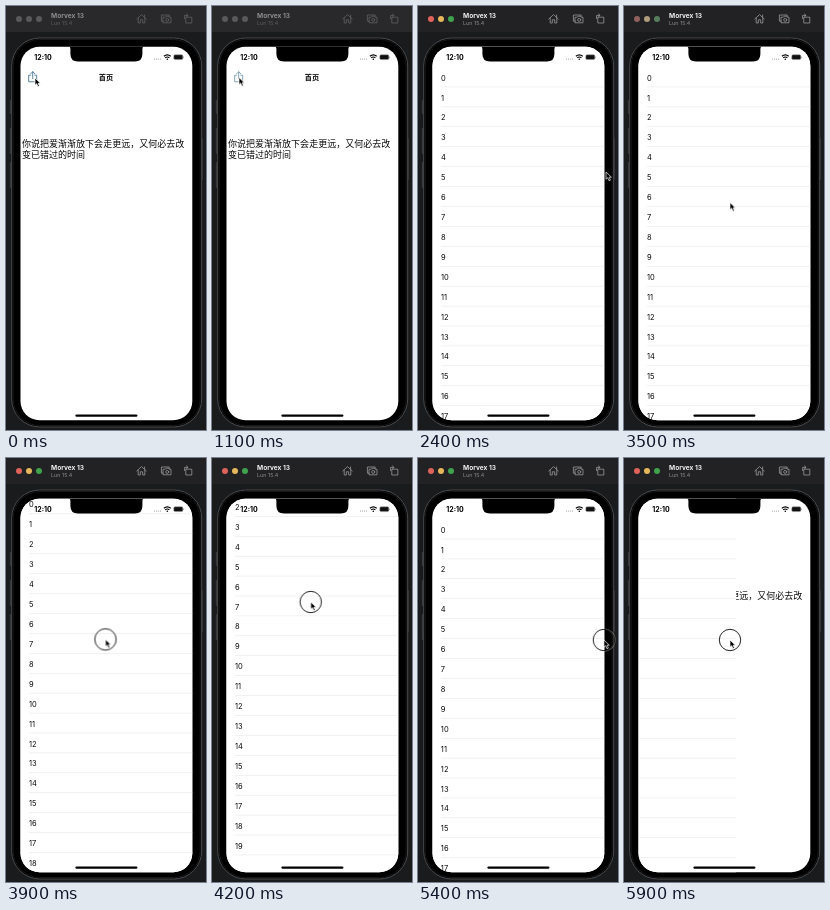
Write an HTML page that moves like this. It is 200 px wide and 424 px high and loops after 6000 ms.

```html
<!DOCTYPE html>
<html lang="zh">
<head>
<meta charset="utf-8">
<title>Drawer demo</title>
<style>
html, body { margin: 0; width: 100%; height: 100%; overflow: hidden; background: #1b1c1e; }
svg { display: block; width: 100%; height: 100%; }
text { font-family: Inter, "Noto Sans CJK SC", "Noto Sans CJK", sans-serif; }
.cjk { font-family: "Noto Sans CJK SC", "Noto Sans CJK", sans-serif; }
.line { fill: none; stroke-linejoin: round; stroke-linecap: round; }

.bar, .title, .lights, .lights circle, .share, .drawer, .rows, .pointer, .touch {
  animation: 6s linear infinite;
}
.bar { animation-name: bar; }
.title { animation-name: focus; }
.lights { animation-name: mute; }
.lights circle { animation-name: unlit; }
.share { animation-name: press; }
.drawer { animation-name: drawer; }
.rows { animation-name: scroll; }
.pointer { animation-name: pointer; }
.touch { animation-name: touch; }

@keyframes bar {
  0%, 21.66% { fill: #29292b; }
  21.67%, 100% { fill: #222224; }
}
@keyframes focus {
  0%, 21.66% { opacity: .5; }
  21.67%, 100% { opacity: 1; }
}
@keyframes unlit {
  0%, 21.66% { fill: #59595b; }
  21.67%, 100% { fill: var(--lit); }
}
@keyframes mute {
  0%, 56.66% { filter: none; }
  56.67%, 61.66% { filter: saturate(.45) brightness(.85); }
  61.67%, 100% { filter: none; }
}
@keyframes press {
  0%, 18.33% { opacity: 1; }
  18.334%, 21.66% { opacity: .75; }
  21.67%, 100% { opacity: 1; }
}
@keyframes drawer {
  0% { transform: translateX(-174px); }
  21.667% { transform: translateX(-174px); animation-timing-function: ease-in-out; }
  28.333%, 90% { transform: none; }
  98.333%, 100% { transform: translateX(-75px); }
}
@keyframes scroll {
  0%, 61.667% { transform: none; }
  70% { transform: translateY(-62.5px); }
  73.333% { transform: translateY(-62.5px); animation-timing-function: ease-in-out; }
  81.667%, 100% { transform: none; }
}
@keyframes pointer {
  0%, 18.33% { transform: translate(29px, 72px); }
  18.334%, 28.333% { transform: translate(27px, 71.5px); }
  40% { transform: translate(188px, 166px); }
  45% { transform: translate(191px, 178px); }
  50% { transform: translate(192px, 188px); }
  58.333% { transform: translate(106px, 196.5px); }
  61.667% { transform: translate(100px, 206.5px); }
  70% { transform: translate(98.7px, 144px); }
  73.333% { transform: translate(98.5px, 142px); animation-timing-function: ease-in-out; }
  81.667% { transform: translate(99px, 206.5px); }
  88.333%, 90% { transform: translate(186px, 182px); }
  98.333%, 100% { transform: translate(106px, 182px); }
}
@keyframes touch {
  0%, 61.66% { opacity: 0; }
  61.67%, 81.66% { opacity: 1; }
  81.67%, 88.33% { opacity: 0; }
  88.34%, 100% { opacity: 1; }
}
</style>
</head>
<body>
<svg viewBox="0 0 200 424">
  <defs>
    <clipPath id="screen"><rect x="14.5" y="40.8" width="171.8" height="373.4" rx="19"/></clipPath>
  </defs>

  <rect width="200" height="424" fill="#1a1b1d"/>
  <rect class="bar" width="200" height="26" fill="#222224"/>
  <g class="lights">
    <circle cx="13" cy="13" r="3" style="--lit: #df625b"/>
    <circle cx="23" cy="13" r="3" style="--lit: #e6b65b"/>
    <circle cx="33" cy="13" r="3" style="--lit: #3fa24c"/>
  </g>
  <g class="title">
    <text x="45" y="12.2" font-size="6.6" font-weight="700" fill="#f0f0f0">Morvex 13</text>
    <text x="45" y="19" font-size="5.4" fill="#8c8c8e">Lun 15.4</text>
    <g class="line" stroke="#98989a" stroke-width=".8">
      <path d="M130.8 13 135.5 8.6 140.2 13M132.2 12v5h2.1v-3.2h2.4V17h2.1v-5M138.6 11V9"/>
      <path d="M157.2 15.2h-1.8V9h7.8v1.4M157.4 11.2h1.9l.8-1h2.2l.8 1h1.9v5.6h-7.6z"/>
      <circle cx="161.2" cy="13.9" r="1.5"/>
      <path d="M180.2 11.2h5.6v5.8h-5.6zM178.6 12.6V9.4h3.2M180.5 8 182 9.4 180.5 10.8"/>
    </g>
  </g>

  <g fill="#38393b">
    <rect x="3.8" y="94" width="2" height="14" rx="1"/>
    <rect x="3.8" y="122" width="2" height="26" rx="1"/>
    <rect x="3.8" y="156" width="2" height="26" rx="1"/>
    <rect x="194.8" y="132" width="2" height="42" rx="1"/>
  </g>
  <rect x="5.7" y="32" width="190" height="389" rx="28" fill="#000" stroke="#4a4b4d"/>
  <rect x="7.2" y="33.5" width="187" height="386" rx="26.5" fill="none" stroke="#171718"/>

  <g clip-path="url(#screen)">
    <rect x="14" y="40" width="173" height="375" fill="#fff"/>
    <g class="share line" stroke="#3f708f" stroke-width=".85">
      <path d="M24.7 69.2h-2v6.6h8v-6.6h-2M26.7 72.5v-6.7M24.7 67.7l2-2 2 2"/>
    </g>
    <g fill="#0a0a0a">
      <text class="cjk" x="100" y="73.8" font-size="7.2" font-weight="700" text-anchor="middle">首页</text>
      <text class="cjk" x="16" y="141.4" font-size="9.03">你说把爱渐渐放下会走更远，又何必去改</text>
      <text class="cjk" x="16" y="151.9" font-size="9.03">变已错过的时间</text>
    </g>

    <g class="drawer">
      <rect x="14" y="40" width="173" height="375" fill="#fff"/>
      <g class="rows" id="rows" font-size="7.5" fill="#0a0a0a"></g>
    </g>

    <path d="M61.4 40q3 0 3 3v5q0 7.5 7.5 7.5h57q7.5 0 7.5-7.5V43q0-3 3-3z"/>
    <text x="28.3" y="53.7" font-size="7" font-weight="700">12:10</text>
    <g fill="#999" id="signal"></g>
    <g class="line" stroke="#000" stroke-width="1.2" style="stroke-linecap: butt">
      <path d="M157.9 50.3q3.4-3 6.8 0M159.2 51.9q2.1-1.8 4.2 0"/>
    </g>
    <circle cx="161.3" cy="53.2" r=".8"/>
    <rect x="167.8" y="48.8" width="9" height="4.8" rx="1.3" fill="#111" stroke="#999" stroke-width=".5"/>
    <rect x="177.3" y="50.4" width=".7" height="1.7" rx=".3" fill="#888"/>
    <rect x="69.4" y="408.4" width="62" height="2.4" rx="1.2"/>
  </g>

  <g class="pointer">
    <g class="touch" fill="none">
      <circle r="11" stroke="#fff" stroke-opacity=".4" stroke-width="1.2"/>
      <circle r="10.7" stroke="#0c0c0c" stroke-width=".9"/>
    </g>
    <path d="M0 0v7.2l1.7-1.5 1.3 3 1.4-.6-1.3-2.9h2.3z" fill="#000" stroke="#fff" stroke-width=".7"/>
  </g>
</svg>
<script>
const ROWS = 20, ROW = 19.92, TOP = 61.3;
let rows = '';
for (let i = 0; i < ROWS; i++) {
  const y = TOP + i * ROW;
  rows += `<text x="23" y="${y + 13.3}">${i}</text>` +
    `<rect x="23" y="${y + ROW - .5}" width="164" height=".5" fill="#e2e2e4"/>`;
}
document.getElementById('rows').innerHTML = rows;

document.getElementById('signal').innerHTML =
  [0, 1, 2, 3].map(i => `<circle cx="${148.5 + i * 2}" cy="53" r=".6"/>`).join('');
</script>
</body>
</html>
```
